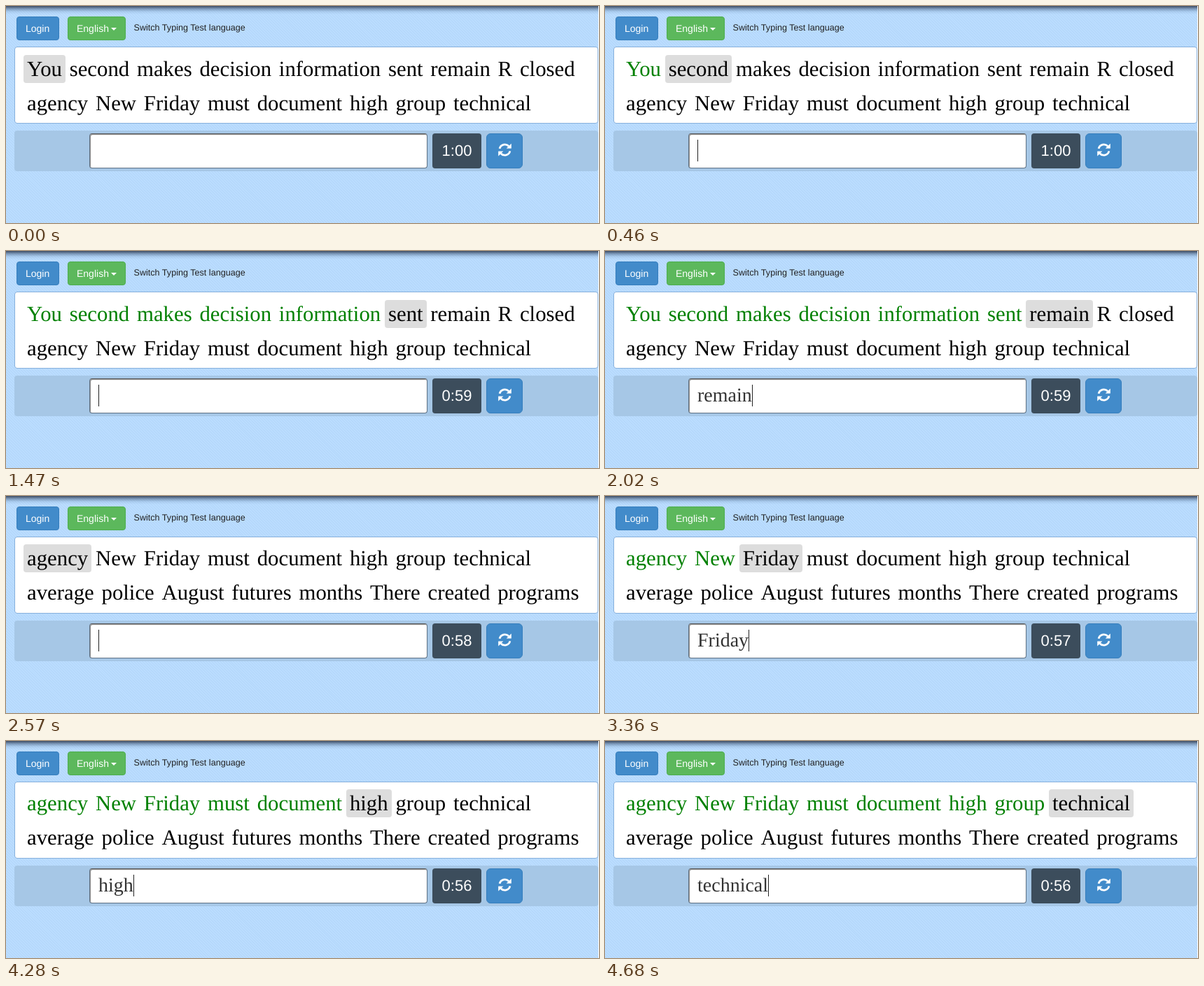
Animation of 847x310 px, one loop 4.83 s. Source, as an HTML page:

```html
<!DOCTYPE html>
<html lang="en">
<head>
<meta charset="utf-8">
<title>Typing test</title>
<style>
  html, body { margin: 0; width: 100%; height: 100%; overflow: hidden; background: #fff; }
  #stage {
    position: relative; width: 847px; height: 310px; overflow: hidden;
    font: 14px/20px "Liberation Sans", Arial, sans-serif;
    text-rendering: geometricPrecision;
  }
  #stage div, #stage svg { position: absolute; box-sizing: border-box; white-space: pre; }
  #sky {
    left: 0; top: 0; width: 846px; height: 310px;
    background:
      linear-gradient(rgba(25,35,55,.78), rgba(35,55,85,.4) 4px, rgba(60,90,130,.12) 8px, transparent 12px),
      repeating-linear-gradient(45deg, #bbddff 0 1.4px, #b5d8fb 1.4px 2.8px);
  }
  .button { border: 1px solid #357ebd; border-radius: 4px; background: #428bca; color: #fff; }
  #login { left: 15px; top: 15px; width: 61px; height: 34px; padding: 6px 12px; }
  #language { left: 88px; top: 15px; width: 83px; height: 34px; padding: 6px 12px; background: #5cb85c; border-color: #4cae4c; }
  #language i { position: absolute; left: 61px; top: 15px; border: 4px solid transparent; border-top-color: #fff; border-bottom: 0; }
  #hint { left: 182.5px; top: 21px; font-size: 12.6px; color: #222; }
  #panel {
    left: 12px; top: 58px; width: 834px; height: 110px; overflow: hidden;
    border: 1px solid #86b0dc; border-radius: 4px; background: #fff;
  }
  .line { left: 12px; display: flex; font: 30.8px/34px "Liberation Serif", "Times New Roman", serif; color: #000; }
  .line span { padding: 3px 5px; margin-right: .75px; border-radius: 4px; }
  .line .done { color: #008000; }
  .line .current { background: #ddd; }
  #bar { left: 12px; top: 178px; width: 834px; height: 58px; border-radius: 4px; background: #a6c7e6; }
  #field {
    left: 119px; top: 182px; width: 483px; height: 50px;
    border: 1px solid #5f7184; border-top-color: #555; border-radius: 4px;
    background: #fff; box-shadow: inset 1px 1px 1px #8a8a8a;
  }
  #entry { left: 132px; top: 191px; height: 31px; font: 28px/31px "Liberation Serif", "Times New Roman", serif; color: #333; }
  #entry.focus { border-right: 1px solid #222; }
  #clock {
    left: 609px; top: 182px; width: 70px; height: 50px; border-radius: 4px;
    background: #3c4d5c; color: #fff; font-size: 22px; line-height: 50px; text-align: center;
  }
  #restart { left: 686px; top: 182px; width: 52px; height: 50px; border-radius: 6px; }
  #restart svg { left: 15px; top: 12px; }
</style>
</head>
<body>
<div id="stage">
  <div id="sky"></div>
  <div id="login" class="button">Login</div>
  <div id="language" class="button">English<i></i></div>
  <div id="hint">Switch Typing Test language</div>
  <div id="panel"></div>
  <div id="bar"></div>
  <div id="field"></div>
  <div id="entry"></div>
  <div id="clock"></div>
  <div id="restart" class="button">
    <svg width="21" height="21" viewBox="-10.5 -10.5 21 21">
      <defs>
        <g id="arrow">
          <path d="M-7.4 -1.8A7.6 7.6 0 0 1 5.6 -5.2" fill="none" stroke="#fff" stroke-width="2.8"/>
          <path d="M9.3 -9V-2H2.2Z" fill="#fff"/>
        </g>
      </defs>
      <use href="#arrow"/>
      <use href="#arrow" transform="rotate(180)"/>
    </svg>
  </div>
</div>
<script>
const LOOP = 4830;
const LINES = [
  "You second makes decision information sent remain R closed",
  "agency New Friday must document high group technical",
  "average police August futures months There created programs",
].map(text => text.split(" "));

// Moments at which the field alternates between empty and a typed word.
const STEPS = [
  0, 150, 300, 390, 540, 620, 770, 850, 1020, 1170,
  1320, 1470, 1640, 1790, 1870, 2030, 2180, 2340,
  2420, 2570, 2730, 2890, 3050, 3200, 3360, 3440,
  3590, 3740, 3900, 3980, 4140, 4290, 4440, 4600, 4680,
];
const TICKS = [1170, 2180, 3200, 4140];
const LINE_PITCH = 49, SCROLL = 50, FIRST_TOP = 11;

const byId = id => document.getElementById(id);
const panel = byId("panel"), entry = byId("entry"), clock = byId("clock");
const words = [];

const lines = LINES.map(list => {
  const line = document.createElement("div");
  line.className = "line";
  for (const text of list) {
    const span = document.createElement("span");
    span.textContent = text;
    line.append(span);
    words.push(span);
  }
  panel.append(line);
  return line;
});

const countPassed = (times, t) => times.filter(time => time <= t).length;

function render(t) {
  const step = countPassed(STEPS, t) - 1;
  const current = Math.max(0, Math.floor((step - 1) / 2));
  const typed = step > 0 && step % 2 === 0;
  const shift = current < LINES[0].length ? 0 : SCROLL;

  lines.forEach((line, i) => line.style.top = FIRST_TOP + i * LINE_PITCH - shift + "px");
  words.forEach((word, i) => {
    word.className = i < current ? "done" : i === current ? "current" : "";
  });
  entry.textContent = typed ? words[current].textContent : "";
  entry.className = step > 0 ? "focus" : "";

  const ticks = countPassed(TICKS, t);
  clock.textContent = ticks ? "0:" + (60 - ticks) : "1:00";
}

const start = performance.now();
let shown = -1;
function frame() {
  const t = (performance.now() - start) % LOOP;
  const key = countPassed(STEPS, t);
  if (key !== shown) render(t);
  shown = key;
  requestAnimationFrame(frame);
}
frame();
</script>
</body>
</html>
```
